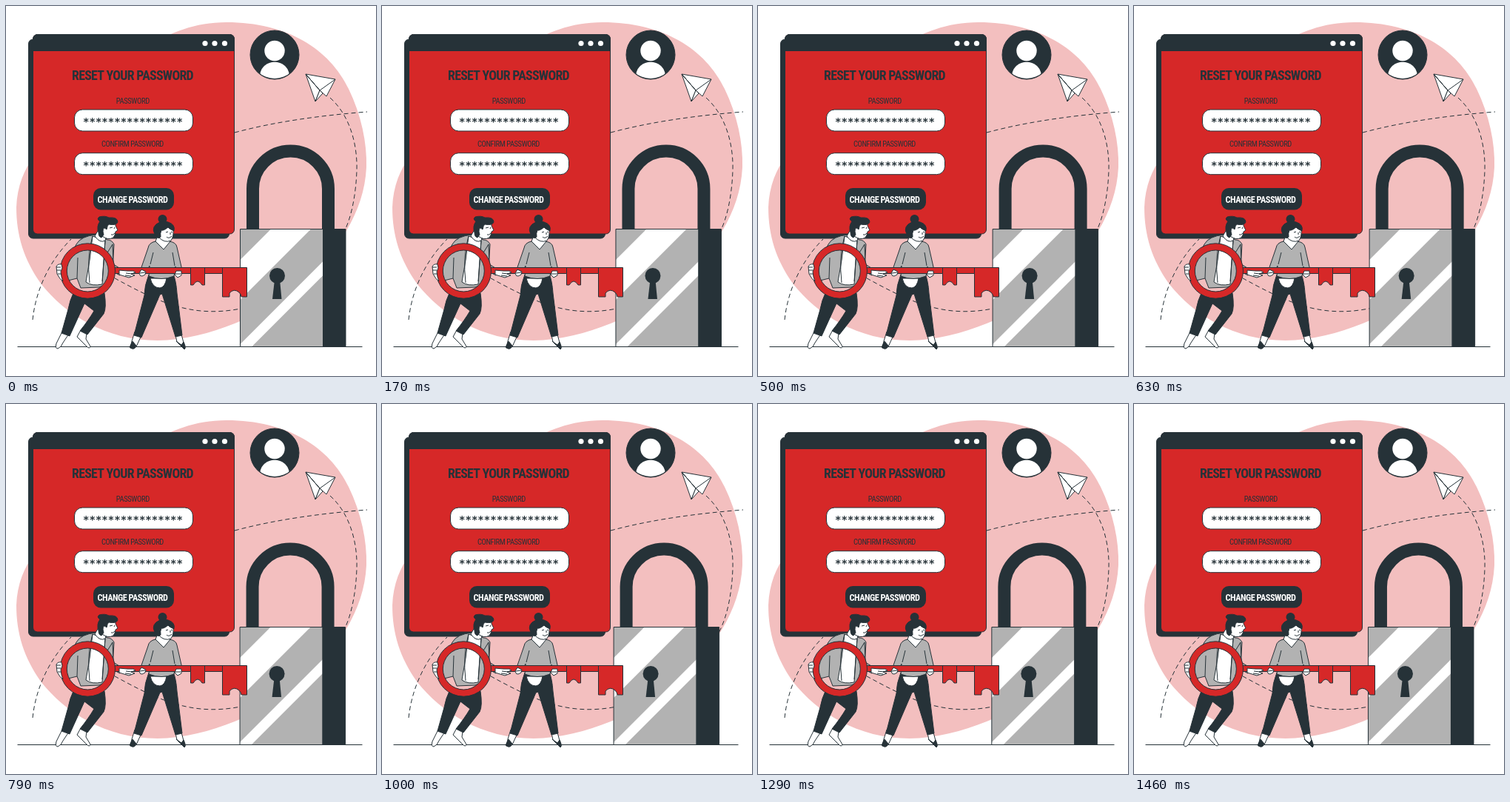
These frames come from a looping animation (500 px wide and 500 px high, 1.5 s). An HTML page with a canvas:

```html
<!DOCTYPE html>
<html lang="en">
<head>
<meta charset="utf-8">
<title>Reset your password</title>
<style>
html, body { margin: 0; width: 100%; height: 100%; overflow: hidden; background: #fff; }
canvas { display: block; width: 100vw; height: 100vh; }
</style>
</head>
<body>
<canvas id="stage"></canvas>
<script>
const SIZE = 500, LOOP = 1500, FRAMES = 36;
const DARK = '#263238', RED = '#d62828', PINK = '#f3bfbf', GREY = '#b2b2b2', WHITE = '#fff';
const canvas = document.getElementById('stage');
const ctx = canvas.getContext('2d');
const ratio = window.devicePixelRatio || 1;
canvas.width = canvas.height = SIZE * ratio;

function paint(path, fill, stroke = DARK, width = 1) {
  if (fill) { ctx.fillStyle = fill; ctx.fill(path, 'evenodd'); }
  if (stroke) { ctx.strokeStyle = stroke; ctx.lineWidth = width; ctx.stroke(path); }
}
const shape = (d, fill, stroke, width) => paint(new Path2D(d), fill, stroke, width);
const line = (d, width) => shape(d, null, DARK, width);

function box(x, y, w, h, r, fill, stroke) {
  const p = new Path2D();
  p.roundRect(x, y, w, h, r);
  paint(p, fill, stroke);
}
function disc(x, y, r, fill, stroke = null) {
  const p = new Path2D();
  p.arc(x, y, r, 0, 7);
  paint(p, fill, stroke);
}

// Narrow caption centred on (x, y); the size shrinks if the face is too wide.
function caption(text, x, y, size, weight, room, color) {
  const setFont = () => {
    ctx.font = `${weight} condensed ${size}px "Roboto Condensed", Roboto, sans-serif`;
    ctx.letterSpacing = `${-0.04 * size}px`;
  };
  setFont();
  const wide = ctx.measureText(text).width;
  if (wide > room) { size *= room / wide; setFont(); }
  ctx.textAlign = 'center';
  ctx.fillStyle = color;
  ctx.fillText(text, x, y + ctx.measureText('H').actualBoundingBoxAscent / 2);
  ctx.letterSpacing = '0px';
}

function backdrop() {
  ctx.fillStyle = WHITE;
  ctx.fillRect(0, 0, SIZE, SIZE);
  shape('M298 22C380 22 437 58 463 112C480 147 488 185 487 218C484 280 448 330 398 380C350 415 275 451 205 452C135 452 80 417 47 375C24 342 14 310 14 272C15 243 25 220 38 203C80 145 120 90 190 55C222 36 255 22 298 22Z', PINK, null);
  ctx.setLineDash([6, 4]);
  line('M36 424C40 385 58 345 88 315');
  line('M309 171C365 156 425 148 488 143');
  line('M438 124C468 151 475 194 474 222C473 254 467 285 457 305C430 365 378 405 317 409C250 422 205 400 140 364');
  ctx.setLineDash([]);
}

function profile() {
  disc(363, 66, 33, DARK, DARK);
  disc(363, 60.5, 13.7, WHITE);
  ctx.save();
  ctx.beginPath();
  ctx.arc(363, 66, 32, 0, 7);
  ctx.clip();
  shape('M343 100V96C343 69 383 69 383 96V100Z', WHITE, null);
  ctx.restore();
}

function plane() {
  shape('M405 92L445 99L433 122L424 114Z', WHITE);
  shape('M405 92L418 129L424 114Z', WHITE);
  shape('M418 129L424 114L428 118Z', WHITE);
  line('M405 92L424 114L445 99');
}

function panel() {
  box(30.5, 45, 271, 269, 6, DARK, DARK);
  box(36.5, 38.5, 272, 269.5, 6, RED, DARK);
  box(36.5, 38.5, 272, 22, [6, 6, 0, 0], DARK, DARK);
  for (const x of [269, 282, 295.5]) disc(x, 50.5, 3.6, WHITE);
  caption('RESET YOUR PASSWORD', 171, 93.5, 20, 700, 164, DARK);
  caption('PASSWORD', 171.3, 128, 12, 400, 45, DARK);
  caption('CONFIRM PASSWORD', 171, 186, 12, 400, 84, DARK);
  for (const y of [140, 198.7]) {
    box(92.5, y, 160, 29, 11, WHITE, DARK);
    ctx.font = 'bold 14px "DejaVu Sans Mono", monospace';
    ctx.textAlign = 'center';
    ctx.fillStyle = DARK;
    ctx.fillText('*'.repeat(16), 171.5, y + 21);
  }
  box(118, 246, 109, 29.5, 10, DARK, null);
  caption('CHANGE PASSWORD', 171, 261, 14, 600, 95, WHITE);
}

function padlock(dx) {
  ctx.save();
  ctx.translate(dx, 0);
  line('M333.5 302V247A51 51 0 0 1 435.5 247V302', 17);
  ctx.fillStyle = GREY;
  ctx.fillRect(316.5, 301.5, 112, 159);
  shape('M316.5 343L358 301.5H412L316.5 397Z', WHITE, null);
  shape('M316.5 457L428.5 345V364L332 460.5H316.5Z', WHITE, null);
  box(316.5, 301.5, 112, 159, 0, null, DARK);
  box(428.5, 301.5, 30.5, 159, 0, DARK, DARK);
  disc(366.5, 364.5, 10.5, DARK);
  shape('M363 370H370L372.5 396H360Z', DARK, null);
  ctx.restore();
}

function man() {
  shape('M76 440L68 456Q66 463 70 463Q75 461 77 455L85 443Z', WHITE);
  shape('M101 438L96 447L109 460Q113 464 114 460L108 450L109 442Z', WHITE);
  shape('M92 386Q86 398 84 410L75 442L86 446L106 402L119 412Q112 424 100 439L110 444L132 416Q136 408 133 388Z', DARK);
  // coat, shirt and sleeves
  shape('M122 309Q101 311 95 322L86 340L76 350L80 372L96 368L101 381L126 380L143 373L146 322Q143 316 137 316Z', GREY);
  shape('M117 311L134 317L130 376Q116 379 108 373Q114 342 117 311Z', WHITE);
  line('M117 311Q109 338 113 374M134 317L130 372M96 368L97 340M138 331L145 345');
  shape('M144 322L145 349L158 357L154 364L139 356L136 335Z', GREY);
  // neck, face and hair
  shape('M125 302L120 311Q127 321 134 317L136 311Z', WHITE);
  shape('M129 295L130 311Q138 317 145 313Q148 309 148 305L151 303L148 297V291Z', WHITE);
  shape('M125 306Q122 298 127 291Q122 288 126 285Q134 283 139 286Q151 285 151 292Q149 297 139 295Q137 296 136 302Q131 297 131 305L132 309L129 313Q125 312 125 306Z', DARK);
  line('M140 300L144 299M142 309Q145 310 147 307M147 299L146 301');
}

function woman() {
  shape('M174 440L170 453L168 462Q175 466 178 456L184 443Z', WHITE);
  shape('M228 440L231 454L239 462L240 455L236 440Z', WHITE);
  shape('M171 453L167 461Q173 466 176 459Z', DARK);
  shape('M230 453L241 464Q244 462 240 454L237 458Z', DARK);
  shape('M193 363Q187 378 187 391L173 445L183 448L208 390L211 389L229 447L238 445L231 388Q230 372 226 362Z', DARK);
  shape('M195 368H217Q215 380 208 381Q198 381 195 368Z', WHITE);
  shape('M202 318Q193 320 192 327L182 356L190 360L194 351L193 365Q210 372 227 365L229 352L230 359L238 357L231 326Q230 319 220 318Z', GREY);
  line('M195 349L199 333M228 351L225 333');
  shape('M204 313L202 318L213 329L222 318L218 315Z', WHITE);
  shape('M205 303L206 312Q214 321 223 317Q227 311 226 301L220 296Z', WHITE);
  disc(211.5, 288, 6, DARK);
  shape('M204 312Q195 302 203 295Q211 289 219 292Q229 295 227 304Q220 301 219 299Q213 304 210 303Q208 307 209 312Q207 314 204 312Z', DARK);
  line('M216 306L219 305M223 305L225 306M217 312Q220 315 224 311M222 306V309');
}

function key() {
  shape('M145 353.5H325.5V393H318Q318 390 315 387Q308 381 302 388V393H292.5V361.5H268.5V377H265Q259 367 253 377H249.5V361.5H145Z', RED);
  line('M249.5 353.5V361.5M268.5 353.5V361.5M292.5 353.5V361.5');
  const ring = new Path2D();
  ring.arc(110.3, 358, 37.2, 0, 7);
  ring.closePath();
  ring.moveTo(138.3, 358);
  ring.arc(110.3, 358, 28, 0, 7);
  paint(ring, RED);
}

function hands() {
  shape('M75 349Q70 348 68 352L69 362Q73 370 77 372L75 366L74 359L76 354Z', WHITE);
  line('M68 353H74M69 357H74M70 362H75');
  shape('M153 357L164 358L172 358L175 360L169 362L174 364L166 367L153 363Z', WHITE);
  line('M162 361L170 362M161 364L169 365');
  shape('M183 356L180 361Q181 366 184 365L188 363L189 359Z', WHITE);
  line('M181 361L188 360');
  shape('M230 358L228 363L232 367L237 364V358Z', WHITE);
  line('M229 362L236 362');
}

// Standard ease curve, bezier (.25,.1) (.25,1), solved by bisection.
function ease(x) {
  let lo = 0, hi = 1, s = x;
  for (let i = 0; i < 24; i++) {
    s = (lo + hi) / 2;
    if (0.75 * s * (1 - s) + s ** 3 < x) lo = s; else hi = s;
  }
  return 0.3 * s * (1 - s) ** 2 + 3 * s * s * (1 - s) + s ** 3;
}

const SWAY = [0, -1, 2, -4, 4, -4, 4, -4, 2, -1, 0];
function shake(time) {
  const p = time / LOOP * 10, i = Math.min(9, Math.floor(p));
  return SWAY[i] + (SWAY[i + 1] - SWAY[i]) * ease(p - i);
}

function render(dx) {
  ctx.setTransform(ratio, 0, 0, ratio, 0, 0);
  ctx.lineCap = 'butt';
  ctx.lineJoin = 'round';
  backdrop();
  panel();
  profile();
  plane();
  line('M15.5 460.5H481.5');
  padlock(dx);
  man();
  woman();
  key();
  hands();
}

const start = performance.now();
function tick() {
  const time = (performance.now() - start) % LOOP;
  const step = Math.floor((time + 5) * FRAMES / LOOP) % FRAMES;
  render(shake(Math.round(step * LOOP / FRAMES / 10) * 10));
  requestAnimationFrame(tick);
}
tick();
</script>
</body>
</html>
```
